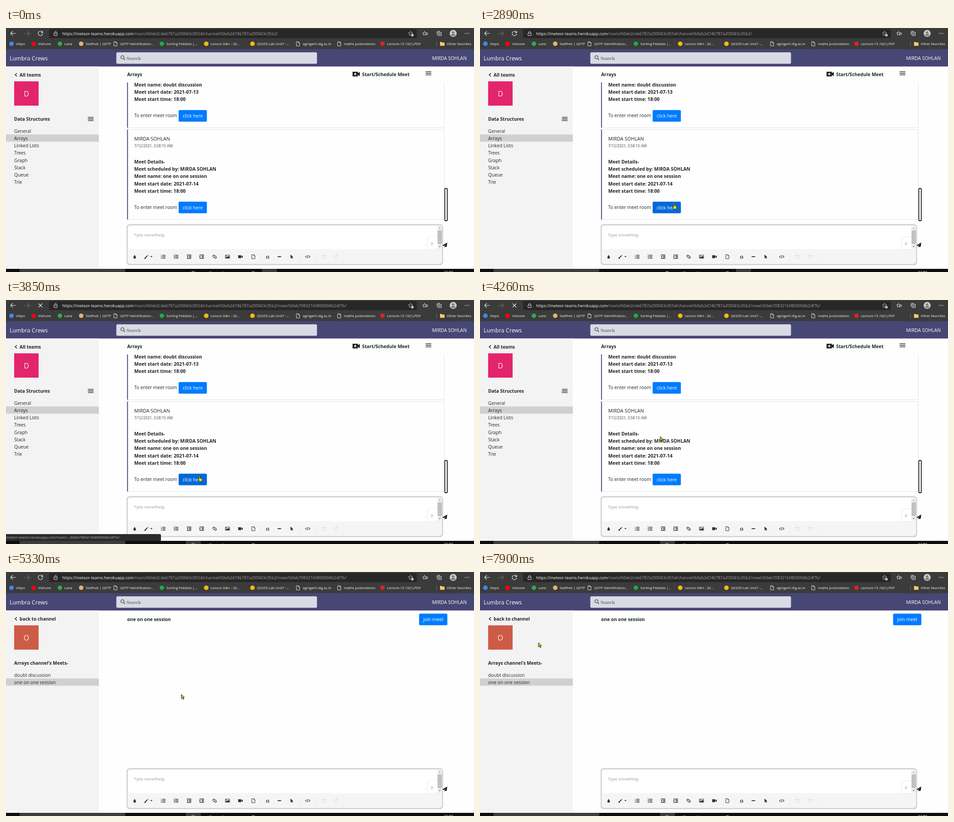
An HTML page with a canvas for the animation above (7.99 s loop, 1033 by 542 pixels).

```html
<!DOCTYPE html>
<html lang="en">
<head>
<meta charset="utf-8">
<title>Team room</title>
<style>
html, body { margin: 0; width: 100%; height: 100%; overflow: hidden; background: #fff; }
canvas { display: block; }
</style>
</head>
<body>
<canvas id="stage" width="1033" height="542"></canvas>
<script>
const ctx = document.getElementById('stage').getContext('2d');
const LOOP = 7990;
const SANS = '"Open Sans", "Noto Sans", sans-serif';
const ARIAL = '"Liberation Sans", Arial, sans-serif';
const SERIF = '"Liberation Serif", serif';
const INK = '#212529', DARK = '#0e0e10', LIGHT = '#f6f6f6', PURPLE = '#464775', BLUE = '#007bff';
const USER = 'MIRDA SOHLAN';

const ICON = {
  drop: 'M0-4C1.6-1.4 2.8 0 2.8 1.4A2.8 2.8 0 0 1-2.8 1.4C-2.8 0-1.6-1.4 0-4Z',
  brush: 'M5-5L0 2-2 0ZM-2.5.8L-.5 2.6C-1 5-3.5 5-5 4.5-4 4-4 1.3-2.5.8Z',
  caret: 'M-2.5-1.2h5L0 1.4Z',
  lines: 'M-2-3.3h7M-2 0h7M-2 3.3h7',
  bullets: 'M-5-4.2h2v1.8h-2ZM-5-.9h2v1.8h-2ZM-5 2.4h2v1.8h-2Z',
  numbers: 'M-4-4.5v2.2M-5-.8h1.2v1.2h-1.2M-5 2.3h1.2v2h-1.2',
  dent: 'M-5-3.8h10M0-1.3h5M0 1.3h5M-5 3.8h10',
  left: 'M-5 0l3.2-2.2v4.4Z',
  right: 'M-1.8 0l-3.2-2.2v4.4Z',
  link: 'M.8-1.2L-.8-2.8A1.7 1.7 0 0 0-3.6-.4L-1.8 1.4A1.7 1.7 0 0 0 .4 1.2M-.8 1.2L.8 2.8A1.7 1.7 0 0 0 3.6.4L1.8-1.4A1.7 1.7 0 0 0-.4-1.2',
  frame: 'M-4.8-3.6h9.6v7.2h-9.6Z',
  hills: 'M-4 2.8V1.4L-2-.6-.8.6 2-2 4 0V2.8ZM-3.6-2.6h1.8v1.6h-1.8Z',
  video: 'M-5-3.2h6.6v6.4h-6.6ZM2-1L5-3V3L2 1Z',
  file: 'M-3.5-4.5H1L3.6-2V4.6H-3.5ZM1-4.5V-2H3.6',
  pointer: 'M-3-5V3.6L-1 2 .6 5 2 4.3.6 1.4H3.4Z',
  code: 'M-2.2-2.6L-5 0-2.2 2.6M2.2-2.6L5 0 2.2 2.6M.9-3.6L-.9 3.6',
  undo: 'M-3.6-4v3h3M-3.4-1.2A3.8 3.8 0 1 1-2.6 2.6',
  redo: 'M3.6-4v3h-3M3.4-1.2A3.8 3.8 0 1 0 2.6 2.6',
  plane: 'M5-5.2L-5.4.8-2.4 2.2 3-2.8-1.2 2.9V5.4L.6 3.5 3.2 4.5Z',
  back: 'M5.5 0H-5.5M-1-4.8L-5.8 0-1 4.8',
  forward: 'M-5.5 0H5.5M1-4.8L5.8 0 1 4.8',
  reload: 'M4.6-2A5 5 0 1 0 5 .6M4.8-5V-1.6H1.4',
  stop: 'M-4-4L4 4M4-4L-4 4',
  lock: 'M-3.6-1.2h7.2v5.4h-7.2ZM-2-1.4V-3a2 2 0 0 1 4 0V-1.4M0 1v1',
  star: 'M0-5L1.5-1.7 5-1.4 2.3.9 3.2 4.3 0 2.5-3.2 4.3-2.3.9-5-1.4-1.5-1.7Z',
  tabs: 'M-4.6 2.4V-3.2a1.4 1.4 0 0 1 1.4-1.4H2M-2.4-2.4H4.8V4.8H-2.4ZM1.2-.6V3M-.6 1.2H3',
  page: 'M-3.4-4.6H.8L3.6-1.8V4.8H-3.4ZM.8-4.6V-1.8H3.6',
  folder: 'M-5-4H-1L0-2.8H5V4.4H-5Z',
  chevron: 'M2-3.6L-1.8 0 2 3.6',
  menu: 'M-6.3-3.6H6.3M-6.3 0H6.3M-6.3 3.6H6.3',
  camera: 'M-8-4.8H3.6V-1L7.8-4.8V5.2L3.6 1.6V5.4H-8Z',
  plus: 'M-5.2.3H.8M-2.2-2.7V3.3',
  glass: 'M1.8 1.8L5 5M2.6-1a3.5 3.5 0 1 1-7 0 3.5 3.5 0 0 1 7 0',
  horns: 'M-2-4V2.2L0 4 2 2.2V-4L1-.6H-1Z',
  arrow: 'M0 0V9.4L2.2 7.4 3.8 10.9 5.6 10.1 4.1 6.7H7Z',
  hand: 'M0 0c1 0 1.3.6 1.3 1.3V5l3 .8c1 .3 1.6 1 1.5 2L5.3 10.5 4.6 13H0L-3 7.6C-3 6.6-2 6.4-1.2 7.2V1.3C-1.2.5-.8 0 0 0Z'
};
for (const key in ICON) ICON[key] = new Path2D(ICON[key]);

// Each move: start, end, steps, from, bend (or null), to, easing power
const MOVES = [
  [620, 1080, 8, [1030, 560], null, [673, 302], .8],
  [1500, 1830, 6, [673, 302], [490, 427], [469, 259], 2.4],
  [2220, 2290, 2, [469, 259], null, [434, 312], 1],
  [2490, 2820, 6, [434, 312], null, [428.5, 389.5], 1],
  [3000, 3240, 4, [428.5, 389.5], null, [428, 393], 1],
  [3850, 4330, 7, [428, 393], null, [387, 271], 2],
  [4870, 4930, 2, [387, 271], null, [387, 272], 1],
  [7380, 7510, 3, [387, 272], null, [211, 210], 1],
  [7710, 7900, 4, [211, 210], null, [129, 157], 1]
];

function cursorAt(t) {
  const move = MOVES.findLast(m => t >= m[0]);
  if (!move) return null;
  const [start, end, steps, from, bend, to, power] = move;
  const step = Math.floor((t - start) / (end - start) * (steps - 1) + .05) + 1;
  const u = Math.min(1, step / steps) ** power;
  return from.map((a, i) => {
    const mid = bend ? bend[i] : (a + to[i]) / 2;
    return (1 - u) ** 2 * a + 2 * u * (1 - u) * mid + u * u * to[i];
  });
}

function rect(x, y, w, h, fill, radius = 0) {
  ctx.fillStyle = fill;
  ctx.beginPath();
  ctx.roundRect(x, y, w, h, radius);
  ctx.fill();
}

function outline(x, y, w, h, color, width, radius = 0) {
  ctx.strokeStyle = color;
  ctx.lineWidth = width;
  ctx.beginPath();
  ctx.roundRect(x, y, w, h, radius);
  ctx.stroke();
}

function dot(x, y, r, fill) {
  ctx.fillStyle = fill;
  ctx.beginPath();
  ctx.arc(x, y, r, 0, Math.PI * 2);
  ctx.fill();
}

function text(str, x, y, size = 10.2, color = INK, weight = 400, family = SANS, align = 'left') {
  ctx.font = `${weight} ${size}px ${family}`;
  ctx.fillStyle = color;
  ctx.textAlign = align;
  ctx.fillText(str, x, y);
}
const bold = (str, x, y, size = 10.2) => text(str, x, y, size, INK, 700);

function icon(name, x, y, color, width = 0, scale = 1) {
  ctx.save();
  ctx.translate(x, y);
  ctx.scale(scale, scale);
  ctx.fillStyle = ctx.strokeStyle = color;
  ctx.lineWidth = width;
  if (width) ctx.stroke(ICON[name]); else ctx.fill(ICON[name]);
  ctx.restore();
}

function button(label, x, y, fill) {
  rect(x, y, 62.4, 25.8, fill, 2.7);
  text(label, x + 31.2, y + 16.9, 10.2, '#fff', 400, SANS, 'center');
}

function browser(t) {
  const loading = t >= 3320 && t < 5330;
  rect(0, 0, 1033, 47, '#3b3b3b');
  rect(95, 2.5, 812, 20, '#272727', 3);
  icon('back', 16, 12, '#eee', 1.2);
  icon('forward', 46, 12, '#737373', 1.2);
  icon(loading ? 'stop' : 'reload', 76, 12, '#eee', 1.2);
  icon('lock', 109.5, 12.5, '#ddd', 1);
  text('https://meteor-teams.herokuapp.com', 124, 15.8, 8.95, '#fff');
  const path = '/room/60eb2cde6787a200043c0554/channel/60eb2d746787a200043c05b2/';
  text(path + (t >= 3850 ? 'meet/60eb70832160800004b2df7b/' : ''), 282, 15.8, 9, '#a5a5a5');
  icon('star', 893, 12, '#bbb', .9);
  dot(897, 16, 3, '#bbb');
  icon('star', 924, 12, '#eee', 1, .9);
  rect(926.5, 11, 5, 1, '#eee');
  rect(927.5, 14, 4, 1, '#eee');
  icon('tabs', 956, 12, '#eee', 1);
  dot(987, 12, 7.8, '#c9c9c9');
  dot(987, 10, 2.6, '#777');
  rect(982.5, 13.5, 9, 4, '#777', [3, 3, 1, 1]);
  for (let i = 0; i < 3; i++) dot(1014 + i * 3.8, 12, .9, '#eee');

  const marks = [
    ['Velpo', 22, '#4285f4'], ['Vidrune', 71, '#f00'], ['Lane', 129, '#34a853'],
    ['Staffnet | QVTP', 176, '#e9b06a'], ['QVTP Identification...', 252],
    ['Sorting Pebbles |...', 354, '#1ba94c'], ['Lesson D', 452, '#f5ba15'],
    ['QX205-Lab Unit7 -...', 554, '#f5ba15'], ['agnigarh.iitg.ac.in', 655],
    ['maths postmidsem', 746], ['Lecture-15-16(1).PDF', 841, '#d8232a']
  ];
  for (const [label, x, color] of marks) {
    if (color) dot(x - 10, 35, 5, color);
    else icon('page', x - 10.5, 35, '#e8e8e8', 1);
    text(label, x, 38, 7.7, LIGHT);
  }
  icon('horns', 487, 35, '#f4c534', 0, .8);
  text('n - Zil...', 490, 38, 7.7, LIGHT);
  rect(950, 29, 1, 12, '#666');
  icon('folder', 963, 35, '#f7cb5f');
  text('Other favorites', 973, 38, 7.7, LIGHT);
}

function appHeader() {
  rect(0, 47, 1033, 38.5, PURPLE);
  text('Lumbra Crews', 8, 72, 12.6, '#fff');
  rect(243.5, 54, 443, 25.5, '#dadae4', 3);
  icon('glass', 258, 66, '#5d6068', 1.7);
  text('Search', 266, 70.5, 10.8, '#74777f', 700, SERIF);
  text(USER, 1017, 70.8, 10.4, '#fff', 400, SANS, 'right');
}

function sidebar(back, letter, color, title, items, selected) {
  rect(0, 85.5, 205, 449, '#f3f3f3');
  icon('chevron', 22, 104, '#111', 1.4);
  bold(back, 30, 107.9, 10.1);
  rect(18, 118.5, 54, 54, color);
  text(letter, 45, 151.5, 16, '#f9eee9', 400, SANS, 'center');
  bold(title, 18, 206, 10.05);
  if (selected >= 0) rect(0, 236.5, 205, 16, '#d0d0d0');
  items.forEach((item, i) => text(item, 18, 232.7 + i * 16.25));
}

function meetCard(name, date, top, y, bottom, hover) {
  ctx.strokeStyle = '#e2e4e7';
  ctx.lineWidth = 1;
  ctx.beginPath();
  if (top > 121) { ctx.moveTo(268, top); ctx.lineTo(967.5, top); }
  else ctx.moveTo(967.5, top);
  ctx.lineTo(967.5, bottom);
  ctx.lineTo(268, bottom);
  ctx.stroke();
  rect(267.3, top, 1.9, bottom - top, PURPLE);
  bold('Meet name: ' + name, 283, y, 10.25);
  bold('Meet start date: ' + date, 283, y + 16.3, 10.5);
  bold('Meet start time: 18:00', 283, y + 32.6, 10.4);
  text('To enter meet room', 283, y + 68.6);
  button('click here', 381, y + 52.5, hover ? '#0069d9' : BLUE);
}

function editor() {
  ctx.save();
  ctx.shadowColor = 'rgba(0,0,0,.2)';
  ctx.shadowBlur = 3;
  rect(267, 436.5, 697, 89.5, '#c4c4c4', 6);
  ctx.restore();
  rect(268.6, 438.2, 693.8, 86, '#fff', 5);
  rect(268.6, 491, 693.8, 33.2, '#f5f5f5', [0, 0, 5, 5]);
  text('Type something', 282, 463, 9.55, '#a6a6a6', 400, ARIAL);
  outline(930.5, 463.5, 22, 28, '#ebebeb', 1, 2);
  text('0', 940.5, 481.5, 9.6, '#999', 400, ARIAL, 'center');
  rect(952, 439, 10.4, 52, '#f1f1f1');
  rect(952.6, 449.5, 9.4, 30.5, '#c1c1c1');
  icon('caret', 957.3, 444.5, '#8a8a8a', 0, -.9);
  icon('caret', 957.3, 485.5, '#505050', 0, .9);

  const y = 508, ink = '#333', pale = '#dcdcdc';
  icon('drop', 284, y, ink);
  icon('brush', 310, y, ink);
  icon('caret', 321, y, ink);
  for (const x of [347, 375.5]) icon('lines', x, y, ink, 1.4);
  icon('numbers', 347, y, ink, .8);
  icon('bullets', 375.5, y, ink);
  for (const x of [404, 432]) icon('dent', x, y, ink, 1.4);
  icon('left', 404, y, ink);
  icon('right', 432, y, ink);
  icon('link', 460.5, y, ink, 1.3);
  icon('frame', 489, y, ink, 1);
  icon('hills', 489, y, ink);
  icon('video', 517.5, y, ink);
  icon('file', 546, y, ink, 1);
  text('Ω', 577.5, y + 3.6, 9.8, ink, 700, ARIAL, 'center');
  rect(599.5, y - 1, 8, 1.9, ink);
  icon('pointer', 631, y, ink);
  icon('code', 666, y, ink, 1.1);
  icon('undo', 701, y, pale, 1.2);
  icon('redo', 729, y, pale, 1.2);
  for (const x of [330, 562, 649, 683, 746]) rect(x, 497, 1, 22, '#ebebeb');
}

function channelPage(hover) {
  sidebar('All teams', 'D', '#e2256c', 'Data Structures',
    ['General', 'Arrays', 'Linked Lists', 'Trees', 'Graph', 'Stack', 'Queue', 'Trie'], 1);
  icon('menu', 187, 202, '#111', 1.3);
  bold('Arrays', 267.5, 106.6);
  icon('camera', 773, 102, '#111');
  icon('plus', 773, 102, '#fff', 1.7);
  bold('Start/Schedule Meet', 786, 106.6, 10.25);
  icon('menu', 932.5, 100.5, '#111', 1.3);
  meetCard('doubt discussion', '2021-07-13', 121, 129.8, 221.5, false);
  meetCard('one on one session', '2021-07-14', 225.5, 333.3, 425.5, hover);
  text(USER, 283, 250.3, 10.7);
  text('7/12/2021, 3:58:15 AM', 283, 265, 8.05, '#6c757d', 600);
  bold('Meet Details-', 283, 300.7, 10.25);
  bold('Meet scheduled by: ' + USER, 283, 317, 10.25);
  rect(967.8, 355.5, 7, 73.5, '#000', 2.5);
  rect(969.4, 357.2, 3.8, 70, '#fff', 1.2);
  editor();
  icon('plane', 969, 482, '#000');
}

function meetPage(ready) {
  sidebar('back to channel', 'O', '#cd5c47', "Arrays channel's Meets-",
    ['doubt discussion', 'one on one session'], ready ? 1 : -1);
  bold('one on one session', 267.5, 109.2);
  button('join meet', 911.8, 92.4, BLUE);
  if (ready) editor();
  icon('plane', 969, ready ? 482 : 518, '#000');
}

function taskbar(focused) {
  rect(0, 535, 1033, 7, DARK);
  rect(30, 535, 233, 7, '#3c3c3e');
  rect(focused ? 397 : 565, 535, 33, 7, '#38393b');
  dot(413, 546, 6, '#4ba3c7');
  dot(451, 546, 5.5, '#2b7bc0');
  dot(480, 546, 5, '#56616b');
  dot(546, 546, 6, '#c9553d');
  text('02:50', 967, 545, 8, '#fff');
}

function draw(t) {
  const cursor = cursorAt(t);
  const onChannel = t < 4520;
  const hover = onChannel && cursor && cursor[0] > 381 && cursor[0] < 443.4 &&
    cursor[1] > 386 && cursor[1] < 411.7;
  rect(0, 0, 1033, 542, '#fefefe');
  browser(t);
  appHeader();
  if (onChannel) channelPage(hover); else meetPage(t >= 5330);
  if (hover && t >= 3050) {
    rect(0, 520, 342, 15, '#2b2b2b', [0, 2.5, 0, 0]);
    text('meteor-teams.herokuapp.com/room/.../60eb70832160800004b2df7b/', 0, 530.4, 7.68, '#b4b4b4');
  }
  taskbar(t >= 3240);
  if (cursor) {
    const shape = hover ? 'hand' : 'arrow';
    icon(shape, ...cursor, hover ? '#e3dc0c' : '#c4dc10');
    icon(shape, ...cursor, '#1c1c08', 1);
  }
}

function tick() {
  draw(performance.now() % LOOP);
  requestAnimationFrame(tick);
}
tick();
</script>
</body>
</html>
```
